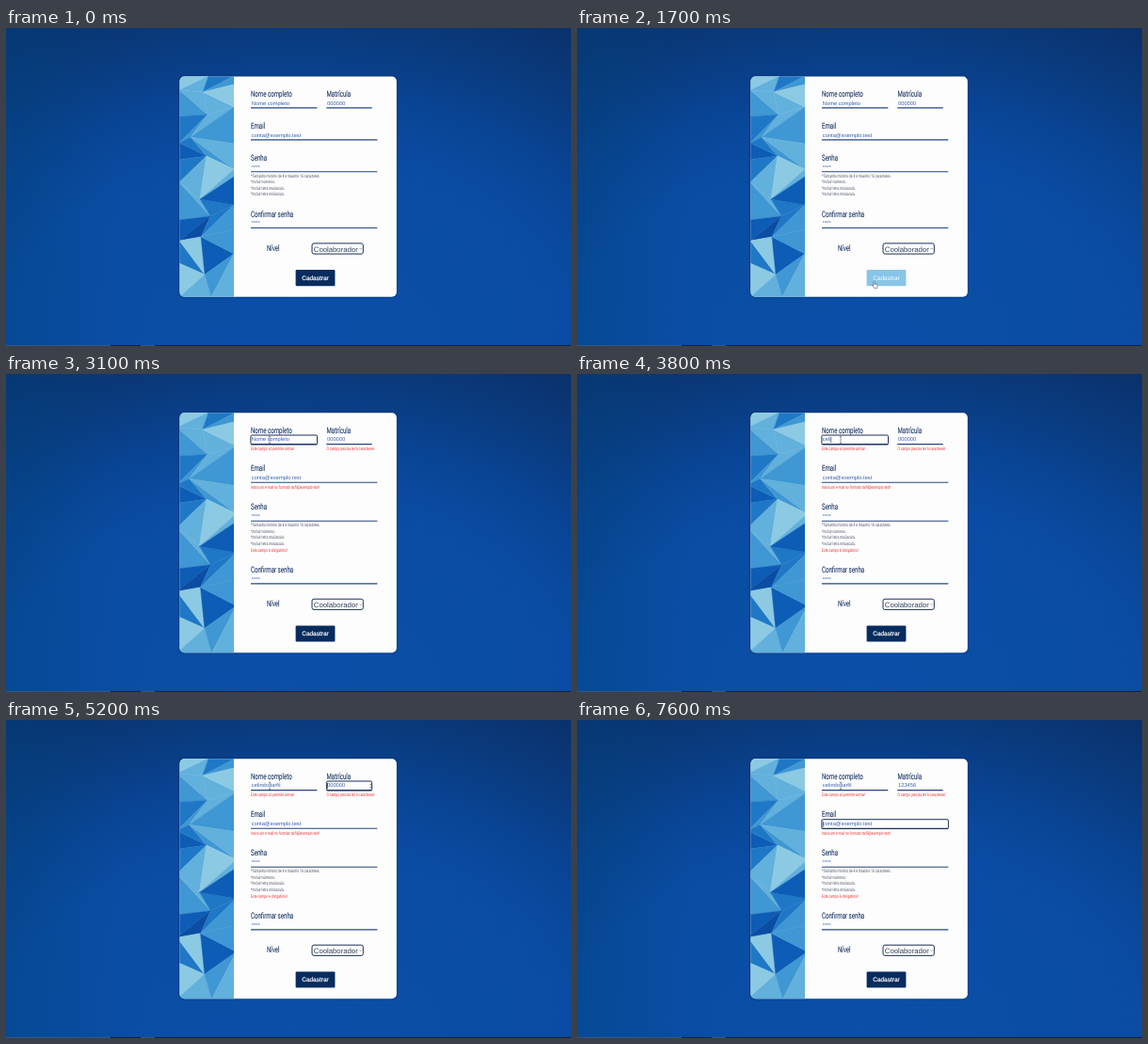
Recreate the animation shown at these times as an HTML page. Size 600 px wide and 338 px high, loop 8 s.

```html
<!DOCTYPE html>
<html lang="pt-BR">
<head>
<meta charset="utf-8">
<title>Cadastro</title>
<style>
  html, body { margin: 0; width: 100%; height: 100%; overflow: hidden; background: #0a4696; }
  svg { display: block; width: 100vw; height: 100vh; }
  text { white-space: pre; text-rendering: geometricPrecision; }
  .label, .note, .error { font-family: Roboto, sans-serif; font-weight: 400; }
  .label { font-size: 8.9px; fill: #1c3765; stroke: #1c3765; stroke-width: .12; }
  .note, .error { font-size: 4.95px; }
  .note { fill: #4c5567; }
  .error { fill: #f02b2b; }
  .value { font: 5.75px "Liberation Sans", Arial, sans-serif; fill: #3c62a8; }
  .line { stroke: #24457f; stroke-width: 1.15; }
  .ring { fill: none; stroke: #1b2f54; stroke-width: 1; }
</style>
</head>
<body>
<svg viewBox="0 0 600 338">
  <defs>
    <radialGradient id="sky" gradientUnits="userSpaceOnUse" cx="0" cy="0" r="1" gradientTransform="translate(300 338) scale(600 420)">
      <stop offset="0" stop-color="#0a4fa8"/>
      <stop offset=".5" stop-color="#0a4ca3"/>
      <stop offset=".65" stop-color="#094494"/>
      <stop offset=".8" stop-color="#0a3a7d"/>
      <stop offset=".97" stop-color="#0a3068"/>
    </radialGradient>
    <linearGradient id="side">
      <stop offset="0" stop-color="#00457f" stop-opacity=".4"/>
      <stop offset=".2" stop-color="#00457f" stop-opacity="0"/>
    </linearGradient>
    <filter id="blur" x="-20%" y="-20%" width="140%" height="140%"><feGaussianBlur stdDeviation="1"/></filter>
    <clipPath id="cardClip"><rect class="card" x="184.5" width="230.3" rx="5"/></clipPath>
    <clipPath id="panelClip"><rect x="184" y="0" width="58" height="338"/></clipPath>
  </defs>
  <rect width="600" height="338" fill="url(#sky)"/>
  <rect width="600" height="338" fill="url(#side)"/>
  <rect y="337" width="600" height="1" fill="#13223a"/>
  <path d="M0 337.5H111M143 337.5H158" stroke="#34587f"/>
  <rect class="card" x="184" width="231" rx="5" fill="#04193c" opacity=".6" filter="url(#blur)"/>
  <g clip-path="url(#cardClip)">
    <rect x="184" width="232" height="338" fill="#fdfdfe"/>
    <g clip-path="url(#panelClip)"><g id="mosaic"></g></g>
  </g>
  <g id="form"></g>
  <rect id="ring" class="ring" rx="1.3"/>
  <rect id="caret" width=".6" height="6.4" fill="#1b2840"/>
  <path id="spinner" d="M386.2 69l1.2-1.5 1.2 1.5zM386.2 71l1.2 1.5 1.2-1.5z" fill="#6b7078"/>
  <g id="pointer" stroke-linejoin="round">
    <path id="arrow" d="M0 0v6l1.4-1.2 1 2.2 1-.5-1-2.1h1.9z" fill="#fff" stroke="#7c8490" stroke-width=".5"/>
    <path id="hand" d="M0 .5q.6-.9 1.2 0v2.6l2.5.6q.7.3.6 1.1l-.6 2.7h-3l-2.2-2.9q.3-.8 1.5 0z" fill="#fff" stroke="#33465f" stroke-width=".55"/>
    <path id="beam" d="M-1.2-3.7h2.4M0-3.7v7.4M-1.2 3.7h2.4" fill="none" stroke="#46536a" stroke-width=".6"/>
  </g>
</svg>
<script>
const LOOP = 8000, ERRORS_AT = 1800;
const NAME = 'celindo tarfil', NAME_START = 3300, NAME_STEP = 130;
const DIGIT_TIMES = [5700, 6000, 6100, 6400, 6600, 7100];
const $ = id => document.getElementById(id);
const show = (node, on) => node.setAttribute('display', on ? 'inline' : 'none');
const place = (node, attrs) => { for (const k in attrs) node.setAttribute(k, attrs[k]); };

// Low-poly panel: each row is left y, middle x, middle y, right y.
const rows = [[51,215,51,51], [66,209,68,60], [94,214,92,84], [122,196,116,123], [140,213,136,150],
  [164,206,182,158], [204,217,200,188], [226,207,222,214], [250,211,262,240], [286,218,286,286]];
const blues = ['#0d5cb5', '#1f78c6', '#3f97d3', '#62b0dc', '#8ccae3', '#0a4da2'];
const shades = '431223341232012313432310051214024323';
$('mosaic').innerHTML = rows.slice(1).map((b, i) => {
  const a = rows[i];
  const tl = [184, a[0]], tm = [a[1], a[2]], tr = [242, a[3]];
  const bl = [184, b[0]], bm = [b[1], b[2]], br = [242, b[3]];
  const triangles = i % 2
    ? [[tl, bm, bl], [tl, tm, bm], [tm, br, bm], [tm, tr, br]]
    : [[tl, tm, bl], [tm, bm, bl], [tm, tr, bm], [tr, br, bm]];
  return triangles.map((points, k) => {
    const color = blues[shades[i * 4 + k]];
    return `<polygon points="${points.join(' ')}" fill="${color}" stroke="${color}" stroke-width=".4"/>`;
  }).join('');
}).join('');

// One condensed face shared by labels, notes and errors.
const narrow = (kind, x, y, text) =>
  `<text class="${kind}" transform="translate(${x} ${y}) scale(.69 1)">${text}</text>`;
const value = (x, y, text, id = '') => `<text class="value" id="${id}" x="${x}" y="${y}">${text}</text>`;
const line = (x1, x2, y) => `<path class="line" d="M${x1} ${y}H${x2}"/>`;
const group = (shift, ...parts) => `<g class="row" data-shift="${shift}">${parts.join('')}</g>`;

$('form').innerHTML =
  group(-10.3,
    narrow('label', 260, 72.8, 'Nome completo'), value(260.8, 81.8, '', 'name'), line(260, 330.3, 84.9),
    narrow('label', 340.5, 72.8, 'Matrícula'), value(341, 81.8, '', 'code'), line(340.3, 388.7, 84.9),
    narrow('error', 260, 91, 'Este campo só permite Letras!'),
    narrow('error', 340.5, 91, 'O campo precisa ter 6 caracteres!')) +
  group(-3.6,
    narrow('label', 260, 107, 'Email'), value(260.8, 115.7, 'conta@exemplo.test'), line(260, 394.3, 118.8),
    narrow('error', 260, 125.2, 'Insira um e-mail no formato tarfil@exemplo.test!')) +
  group(3.5,
    narrow('label', 260, 140.7, 'Senha'), value(260.8, 149.6, '****'), line(260, 394.3, 152.7),
    ['*Tamanho mínimo de 4 e máximo 16 caracteres.', '*Incluir números.',
     '*Incluir letra maiúscula.', '*Incluir letra minúscula.']
      .map((text, i) => narrow('note', 260, 158.5 + i * 6.6, text)).join(''),
    narrow('error', 260, 185, 'Este campo é obrigatório!')) +
  group(10.3,
    narrow('label', 260, 200.6, 'Confirmar senha'), value(260.8, 209.4, '****'), line(260, 394.3, 212.5),
    narrow('label', 277, 236.7, 'Nível'),
    '<rect class="ring" x="325" y="228.9" width="54.3" height="11.2" rx="2"/>',
    '<text class="value" x="326.8" y="237.5" style="font-size:7.75px;fill:#33425e">Coolaborador</text>',
    '<path d="M375.7 234.2l1 1 1-1" fill="none" stroke="#40506c" stroke-width=".6"/>',
    '<rect id="button" x="307.6" y="257.1" width="41.8" height="17.2" rx="1"/>',
    '<text class="value" id="send" x="314.2" y="268.1" style="font-size:6.5px;fill:#fff;stroke:#fff">Cadastrar</text>');

const path = [[100, 372, 236], [200, 343, 231], [500, 343, 231], [600, 330, 258], [700, 318, 266],
  [900, 318, 267], [1700, 315, 269], [1800, 309, 254], [2400, 280, 70]];

function pointerAt(t) {
  const next = path.findIndex(p => p[0] > t);
  if (next < 0) return path[path.length - 1].slice(1);
  if (next === 0) return path[0].slice(1);
  const [t0, x0, y0] = path[next - 1], [t1, x1, y1] = path[next];
  const k = (t - t0) / (t1 - t0);
  return [x0 + (x1 - x0) * k, y0 + (y1 - y0) * k];
}

const hoverAt = t => t >= ERRORS_AT || t < 600 ? 0 : t < 700 ? .5 : 1;

function drawFocus(t, name, code) {
  const field = t < 2600 ? null
    : t < 5200 ? { x: 259.9, y: 65, w: 70.6, start: 2600, node: $('name'), text: name }
    : t < 7400 ? { x: 340.4, y: 65, w: 48.2, start: 5200, node: $('code'), text: code }
    : { x: 259.9, y: 105.7, w: 134.5, start: 7400, text: '' };
  show($('ring'), field);
  show($('caret'), false);
  show($('spinner'), field && field.node === $('code'));
  if (!field) return;
  place($('ring'), { x: field.x, y: field.y, width: field.w, height: 9.9 });
  const typed = field.text ? field.node.getComputedTextLength() : 0;
  place($('caret'), { x: field.x + 1 + typed, y: field.y + 1.8 });
  show($('caret'), field.text || (t - field.start) % 1000 < 500);
}

function draw(t) {
  const invalid = t >= ERRORS_AT;
  const top = invalid ? 41.2 : 51.6, height = 337.4 - 2 * top;
  document.querySelectorAll('.card').forEach(card => place(card, { y: top, height }));
  document.querySelectorAll('.error').forEach(error => show(error, invalid));
  document.querySelectorAll('.row').forEach(row =>
    place(row, { transform: `translate(0 ${invalid ? row.dataset.shift : 0})` }));
  place($('mosaic'), { transform: `translate(213 168.7) scale(${height / 234.2}) translate(-213 -168.7)` });

  const name = NAME.slice(0, Math.max(0, Math.floor((t - NAME_START) / NAME_STEP) + 1));
  const code = '123456'.slice(0, DIGIT_TIMES.filter(time => t >= time).length);
  $('name').textContent = name || 'Nome completo';
  $('code').textContent = code || '000000';
  drawFocus(t, name, code);

  const hover = hoverAt(t);
  const mix = (a, b) => Math.round(a + (b - a) * hover);
  place($('button'), { fill: `rgb(${mix(8, 135)},${mix(44, 197)},${mix(94, 230)})` });
  $('send').style.strokeWidth = .2 * (1 - hover);

  const [x, y] = pointerAt(t);
  const kind = t >= 2300 ? 'beam' : t >= 600 && t < ERRORS_AT ? 'hand' : 'arrow';
  for (const id of ['arrow', 'hand', 'beam']) show($(id), id === kind);
  show($('pointer'), t >= 100);
  place($('pointer'), { transform: `translate(${x} ${y})` });
}

function tick() {
  draw(Math.floor(performance.now() % LOOP / 100) * 100);
  requestAnimationFrame(tick);
}
tick();
</script>
</body>
</html>
```
